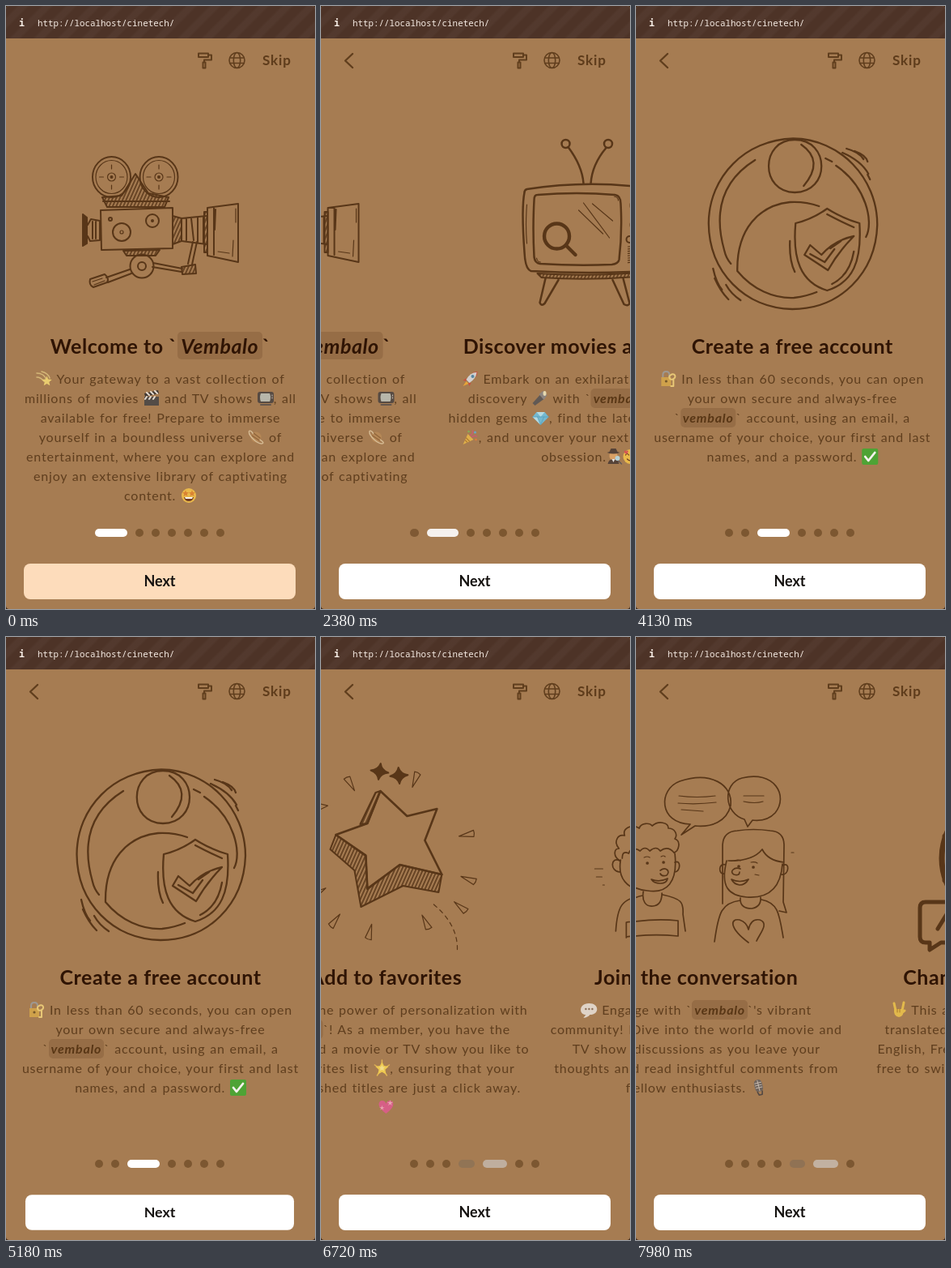
Recreate the animation shown at these times as an HTML page. Size 382 by 744 pixels, loop 8000 ms.

```html
<!DOCTYPE html>
<html lang="en">
<head>
<meta charset="utf-8">
<title>Onboarding</title>
<style>
html, body { margin: 0; width: 100%; height: 100%; overflow: hidden; background: #3a2416; }
#stage { position: relative; width: 382px; height: 744px; overflow: hidden; background: #a67c52;
  border-radius: 4px; font-family: Lato, "Noto Sans", sans-serif; }
#bar { position: absolute; inset: 0 0 auto; height: 40px; color: #f6ece4;
  background: repeating-linear-gradient(135deg, #fff0 0 9px, #ffffff08 12px 18px, #fff0 21px), #4d3327;
  font: 10.85px/42px "Noto Sans Mono", "DejaVu Sans Mono", monospace; }
#bar span { position: absolute; left: 39px; white-space: nowrap; }
#bar b { position: absolute; left: 16px; font-size: 12px; }
svg { fill: none; stroke: #583618; stroke-width: 2; stroke-linecap: round; stroke-linejoin: round; }
#head, .art { position: absolute; left: 0; top: 0; }
#head { stroke: #603e1d; }
.ink { fill: #583618; }
.hatch { fill: url(#hatch); }
.thin { stroke-width: 1.2; }
#skip { position: absolute; left: 317px; top: 57px; font: bold 17px/20px Lato, sans-serif;
  letter-spacing: .9px; color: #5e3c1b; }
#track { position: absolute; left: 0; top: 0; }
.page { position: absolute; top: 0; width: 382px; height: 744px; }
h1 { position: absolute; top: 402px; width: 100%; margin: 0; font: bold 25px/34px Lato, sans-serif;
  letter-spacing: .55px; text-align: center; white-space: nowrap; color: #2f1404; }
p { position: absolute; top: 447.5px; width: 100%; margin: 0; font-size: 16px; line-height: 24px;
  letter-spacing: .78px; word-spacing: 1px; text-align: center; color: #5f3e1e; }
p span { display: block; height: 24px; white-space: nowrap; }
em { display: inline-block; padding: 0 4.5px; border-radius: 5px; background: #5a3a1c38; font-weight: bold; }
p em { padding: 0 3px; color: #583615; }
.emo { width: 20px; height: 20px; vertical-align: -4px; stroke: none; opacity: .9; overflow: visible; }
#dots { position: absolute; left: 110px; top: 645px; display: flex; gap: 10px; }
#dots i { height: 10px; border-radius: 5px; }
#next { position: absolute; left: 22px; top: 688px; width: 336px; height: 44px; border-radius: 8px;
  font: bold 18px/43px Lato, sans-serif; text-align: center; color: #151210; }
</style>
</head>
<body>
<div id="stage">
  <div id="track"></div>
  <div id="bar"><b>i</b><span>http://localhost/cinetech/</span></div>
  <svg id="head" width="382" height="100">
    <defs>
      <pattern id="hatch" width="4" height="4" patternUnits="userSpaceOnUse" patternTransform="rotate(24)">
        <path d="M1 0V4" stroke="#583618" stroke-width="1.6"/>
      </pattern>
    </defs>
    <path id="back" d="M39 59L30 67.5L39 76" stroke-width="2.4"/>
    <path d="M238 58.5h12v4.500h-12zM250 60.5h4v6h-9v3M243.500 69.500h3v7h-3z"/>
    <g stroke-width="1.6"><circle cx="285.5" cy="67" r="9.5"/><ellipse cx="285.5" cy="67" rx="4.2" ry="9.5"/>
      <path d="M277 64h17M277 70.5h17"/></g>
  </svg>
  <div id="skip">Skip</div>
  <div id="dots"></div>
  <div id="next">Next</div>
</div>
<script>
const LOOP = 8000, WIDTH = 382;
const SLIDES = [2235, 3772, 5382, 6642, 7900];
const PRESSES = [2030, 3595, 5153, 6515, 7640];
const $ = id => document.getElementById(id);

const path = (d, cls = '') => `<path class="${cls}" d="${d}"/>`;
const oval = (x, y, rx, ry = rx, cls = '') => `<ellipse class="${cls}" cx="${x}" cy="${y}" rx="${rx}" ry="${ry}"/>`;
const at = (x, y, deg, shape) => `<g transform="translate(${x} ${y}) rotate(${deg})">${shape}</g>`;
const weight = (w, shape) => `<g stroke-width="${w}">${shape}</g>`;
const repeat = (n, draw) => Array.from({ length: n }, (_, i) => draw(i)).join('');
const star = (x, y, r, k = .45) => 'M' + Array.from({ length: 10 }, (_, i) => {
  const a = i * Math.PI / 5 - Math.PI / 2, q = i % 2 ? r * k : r;
  return (x + q * Math.cos(a)).toFixed(1) + ' ' + (y + q * Math.sin(a)).toFixed(1);
}).join('L') + 'z';

// Emoji, each on a 20 x 20 grid
const fill = (c, d) => `<path fill="${c}" d="${d}"/>`;
const disc = (c, x, y, r, ry = r) => `<ellipse fill="${c}" cx="${x}" cy="${y}" rx="${r}" ry="${ry}"/>`;
const line = (c, w, d) => `<path fill="none" stroke="${c}" stroke-width="${w}" d="${d}"/>`;
const HEART = 'M10 18C-3 9 1 2 5 2Q9 2 10 6Q11 2 15 2C19 2 23 9 10 18z';
const face = disc('#f2c04a', 10, 10, 9);
const EMOJI = {
  dizzy: line('#d9bd7c', 1.6, 'M1 3Q10 3 13 11M1 8Q6 8 10 13M7 1Q15 3 17 9') + fill('#f1d573', star(13.5, 13, 6.5)),
  clap: fill('#4b4746', 'M1 8h18v11H1z') + fill('#37302e', 'M1 4L18 0l1 4L2 8z') +
    line('#ece5dd', 2, 'M4 3l3 3M9 2l3 3M14 1l3 3M4 8l-2 3M9 8l-2 3M14 8l-2 3'),
  tv: fill('#4e4541', 'M3 2h14q3 0 3 3v8q0 3-3 3H3q-3 0-3-3V5q0-3 3-3z') + line('#5c524d', 2, 'M4 18h12') +
    fill('#b9bdb4', 'M4 4h11q2 5 0 10H4q-2-5 0-10z') + line('#d6cdc2', 1, 'M18 6v1M18 9v1'),
  planet: disc('#b88a58', 10, 10, 6.5) + line('#8d6238', 1.2, 'M7 5l8 6M5 8l9 6') +
    at(10, 10, 42, line('#dcc39c', 1.4, 'M-6-1C-15-3-12 4 0 4S15-3 6-1')),
  starry: face + fill('#e0842f', star(6, 7.5, 4.2)) + fill('#e0842f', star(14, 7.5, 4.2)) +
    fill('#6a331b', 'M4 12h12q-1 5-6 5t-6-5z') + fill('#fff', 'M5 12h10l-1 2H6z'),
  rocket: fill('#c94b3d', 'M5 9L1 12l4 1zM11 15l-2 4l-2-4zM13 2l6-1l-1 6z') +
    fill('#d6d9dc', 'M18 2Q10 2 5 11l4 4Q17 10 18 2z') + disc('#4f87a8', 13, 7, 2) + fill('#efaa36', 'M5 13l3 3l-7 3z'),
  torch: fill('#5a5655', 'M1 16L10 6l5 5L4 19z') + fill('#8b8583', 'M9 5l5-4l5 5l-4 6z') + disc('#ece2ba', 16, 4, 2, 3),
  gem: fill('#6fbfdd', 'M5 3h10l5 6l-10 10L0 9z') + fill('#b6e5f2', 'M5 3l5 6l5-6zM0 9h6l4 10z') + line('#4a9fc3', .7, 'M0 9h20M6 9l4 10l4-10'),
  party: fill('#e6b64a', 'M1 19L7 6l7 7z') + line('#b27a33', 1.2, 'M5 11l4 4M4 14l2 2') +
    line('#cf5874', 1.5, 'M10 8q4-2 3-6M12 10q3-3 6-1') + disc('#66a9d0', 16, 4, 1.5) + disc('#82b45a', 8, 3, 1.3) + disc('#e77b3b', 17, 13, 1.3),
  sleuth: disc('#dfa568', 9, 9, 5, 6) + fill('#4e3d36', 'M1 5Q9 8 17 5l-3-1l-2-4H6L4 4zM2 19q1-6 7-6t7 6z') +
    fill('#eee', 'M7 13h4l-2 4z') + line('#59565a', 1.5, 'M15 15l4 4') + disc('#b9dae2', 14, 12, 3),
  love: face + line('#65351d', 1.2, 'M4 8q2-3 4 0M12 8q2-3 4 0M6 13q4 4 8 0') +
    [[2, 2], [15, 1], [14, 14]].map(([x, y]) => `<g transform="translate(${x} ${y}) scale(.28)">${fill('#dc4f52', HEART)}</g>`).join(''),
  lock: line('#9e9c98', 2, 'M3 9V5q0-4 4-4t4 4v4') + fill('#d4a64b', 'M1 8h12v11H1z') +
    line('#efd07a', 2, 'M16 10v9h-3M13 5a3 3 0 1 1 3 5a3 3 0 1 1-3-5') + disc('#6f5226', 7, 13, 1.6),
  check: fill('#45a832', 'M2 0h16q2 0 2 2v16q0 2-2 2H2q-2 0-2-2V2q0-2 2-2z') + line('#fff', 2.8, 'M4 10l4 5l8-10'),
  palette: fill('#c79361', 'M10 2C-2 2-3 18 9 18q4 0 2-4t4-2q5 0 5-4q-1-6-10-6z') + disc('#cc4840', 5, 7, 2) +
    disc('#e5bf42', 10, 5, 2) + disc('#579c62', 15, 8, 2) + disc('#4c79ac', 4, 12, 2) + line('#58382a', 1.5, 'M13 17l6-7'),
  glow: line('#e6b955', 1.5, 'M10 0v3M1 6l3 2M19 6l-3 2M4 19l2-3M16 19l-2-3') + fill('#f6d251', star(10, 10.5, 8.5, .5)) + fill('#fbe78e', star(10, 10, 4, .5)),
  heart: fill('#dc5c8c', HEART) + fill('#f1aebd', star(15, 5, 4, .3)) + fill('#f1aebd', star(5, 11, 3.5, .3)),
  speech: fill('#e6ddd4', 'M10 2C-3 2-3 16 6 16l-3 4q6-1 8-4C23 16 23 2 10 2z') + repeat(3, i => disc('#8a6e58', 6 + 4 * i, 9, 1.2)),
  mic: at(10, 10, -14, `<g transform="translate(-10 -10)">${fill('#68615e', 'M5 6q0-6 5-6t5 6v4q0 5-5 5t-5-5z') +
    line('#c8beb5', 1, 'M6 4h8M6 7h8M6 10h8M10 1v13') + line('#4b4341', 1.6, 'M7 15l1 4h4l1-4')}</g>`),
  hand: line('#e9c04c', 3, 'M4 2l2 9M16 1l-2 10M17 11l-4 3') + fill('#e9c04c', 'M4 9h11q2 9-5 10Q3 18 4 9z') + line('#a97828', 1, 'M8 9v4M11 9v4')
};

// Illustrations, in page coordinates
const reel = x => oval(x, 211, 23.5, 25) + oval(x, 211, 19.5, 20.5, 'thin') + oval(x, 211, 5, 5, 'thin') + oval(x, 211, 1, 1, 'ink') +
  repeat(4, i => at(x, 211, i * 90, path('M10 0h5', 'thin')));
const camera = () => path('M119 236L125 248H196L201 236L176 231L160 207L143 234z', 'hatch') + reel(130.5) + reel(189) +
  path('M120 241H202M117 252L206 249V299L118 301z') +
  oval(143, 279, 11) + oval(143, 279, 2, 2, 'thin') + oval(181, 265, 8) + oval(181, 265, 1) + oval(129, 263, 2) +
  path('M95 257L100 261V293L95 296z', 'ink') + path('M101 270L105 263L116 265V289L104 290L101 284M107 266V287M111 266V287') +
  path('M206 259L217 262V290L206 294z', 'hatch') + path('M217 262L248 259M217 290L248 294M223 262V289M229 262L232 289M237 261V291M244 260V292') +
  path('M249 249L287 244V316L249 308zM257 248V307M259 251l-1 25') + path('M245 254h4v50h-4z', 'hatch') + path('M284 250v17M281 289l-1 20M262 303l14 2', 'thin') +
  path('M145 302L149 308H185L190 301z', 'hatch') + oval(168, 321, 14.5) + oval(168, 321, 5) +
  path('M153 325L124 335M155 330L126 341M104 337L122 331Q128 336 125 341L108 347Q102 344 104 337zM182 317L218 324M181 322L217 328M236 291L230 319M231 291L225 318') +
  path('M217 322L234 319L235 330L218 331z', 'hatch') + path('M107 340l12-4M109 344l13-5', 'thin');

const tv = () => weight(2.5, oval(161, 170, 5) + oval(213.5, 170, 5) +
  path('M164 174C176 190 182 205 183 219M211 175C200 188 193 204 192 219') +
  path('M113 226Q190 214 267 225Q273 229 273 260Q274 300 271 320Q270 327 260 327Q190 331 118 327Q111 325 110 304Q106 250 110 230Q110 227 113 226z') +
  path('M126 233Q175 229 222 233Q229 234 229 244Q231 280 227 313Q226 318 218 319Q175 321 129 318Q123 317 122 310Q120 275 122 239Q122 233 126 233z') +
  path('M136 336L129 366Q131 371 135 367L152 338M219 338L233 368Q238 371 240 367L232 336')) +
  weight(4.4, oval(150, 284, 15.5) + path('M162 296L173 307')) +
  path('M177 252L207 281M183 243L215 286M194 244L219 265M113 245Q111 270 113 293M221 235q5 1 5 5M125 311q1 5 5 5', 'thin') +
  oval(251, 246, 10, 11) + path('M244 239L254 256M249 236L260 253M252 235l7 13') + path('M241 236q4-4 8-4M262 238q4 8 0 16', 'thin') +
  oval(250, 270, 9, 8) + oval(250, 270, 5, 4, 'thin') + path('M243 261q7-4 14 1', 'thin') + oval(240, 288, 4) + oval(260, 288, 4) +
  repeat(8, i => path(`M238 ${297 + i * 2.8}Q250 ${296 + i * 2.8} 262 ${297 + i * 2.8}`, 'thin')) +
  path('M126 330Q188 334 250 329L246 334Q188 339 131 335z', 'hatch');

const account = () => weight(2.3,
  path('M192 163.5C250 164 296 212 296 270C294 330 250 374 191 374C132 373 88 328 87.5 268C88 210 133 165 192 163.5z') +
  path('M145 190C100 218 95 260 107 302Q109 311 115 318M232 188L240 192M245 197C282 222 292 266 282 285') +
  path('M194 165C238 165 238 230 194 230C151 230 151 165 194 165zM202 171Q231 191 205 222') +
  path('M224 247Q207 241 188 242C150 246 122 275 123 327C142 350 168 361 193 360Q209 358 221 353') +
  path('M234 250Q253 262 274 268C277 315 266 341 234 351C201 341 191 312 195 268Q216 263 234 250zM234 257Q251 266 267 273M267 303Q262 332 240 343M188 290Q187 314 194 328') +
  path('M206 307L213 295L227 307Q243 289 267 284Q248 303 235 326zM213 306L231 316L243 300M238 299l13-9') +
  path('M253 181Q276 191 285 207M258 176Q273 180 279 189M268 179Q282 184 284 192M284 208l3 6M93 324Q97 342 104 350M95 336Q102 352 112 362M109 344Q115 355 127 363'));

const SPARK = 'M0-10Q2-2 11 0Q2 2 0 10Q-2 2-11 0Q-2-2 0-10z';
const RAYS = [[147, 181], [227, 176], [291, 244], [98, 233], [293, 299], [283, 333], [108, 315], [128, 350], [171, 364], [240, 352]];
const favorite = () => path('M129 244L122 262L152 288L160 333L212 307L256 315L260 293L208 281L168 310L166 269z', 'hatch') +
  path('M184 190L178 192L159 231L168 230z', 'hatch') +
  weight(2.6, path('M184 190L217 221L254 212L239 251L260 293L208 281L168 311L166 270L129 244L168 230z')) +
  at(183, 166, 8, path(SPARK, 'ink')) + at(207, 171, -4, path(SPARK, 'ink')) +
  at(102, 210, 12, path(star(0, 0, 17, .42), 'thin')) +
  RAYS.map(([x, y]) => at(x, y, Math.atan2(262 - y, 195 - x) * 180 / Math.PI, path('M10 0L-8-4Q-10 0-9 4z', 'thin'))).join('') +
  '<path class="thin" stroke-dasharray="5 5" d="M250 330Q281 356 279 388"/>';

const talk = () => weight(1.7,
  path('M171 244L182 231C143 230 142 188 169 178C207 165 235 182 232 208C227 228 208 235 188 233zM253 234L249 225C224 218 221 181 246 174C286 164 304 196 287 217Q277 228 259 226z') +
  path('M168 196Q190 199 213 196M167 205Q190 207 214 204M171 213l27 2M248 196h25M248 203Q262 206 272 203', 'thin') +
  path('M98 276C89 270 91 261 97 261C90 253 95 243 104 245C101 236 112 231 119 236C121 229 132 229 135 233C143 226 155 229 155 236C163 236 167 244 163 249C171 252 168 264 162 266') +
  path('M101 273Q101 263 109 267Q112 258 120 264Q126 257 132 264Q140 257 145 264Q154 257 162 266') +
  path('M99 275C95 298 107 311 129 313C153 317 167 303 163 267M98 276C87 270 85 289 98 290M163 278C171 274 170 290 163 290M145 288C152 283 158 289 153 294Q147 296 145 292M134 299Q144 303 154 298Q153 304 145 304Q137 304 134 299z') +
  path('M124 314C122 326 127 333 136 332Q147 331 147 316M123 319C101 324 95 331 93 363M148 318C171 323 174 327 173 342L176 363M106 371V352Q140 347 167 350V369Q135 366 106 370') +
  oval(129, 279, 1) + oval(149, 278, 1) + path('M67 286h10M69 296h7M77 306h2M125 272q4-2 7 0M146 271q3-2 5 0M307 266h3', 'thin') +
  path('M222 329V258Q222 240 240 239Q260 236 281 239Q298 240 298 257L297 327L301 340L292 338M229 276Q259 277 271 262Q278 276 298 278') +
  path('M227 276C219 308 229 319 252 321C281 323 294 308 296 280M226 281C216 278 217 294 224 292M296 282C306 276 304 295 295 293M244 286C236 283 230 290 236 293Q243 295 243 290M233 299Q243 304 254 299Q250 306 243 306Q236 305 233 299z') +
  path('M244 322C243 332 250 335 258 335Q270 333 269 321M244 325C221 328 217 339 212 376M270 324C291 328 292 342 297 371M254 377C230 359 231 347 243 349Q252 352 254 361Q257 347 268 349C280 353 268 366 264 375') +
  oval(242, 283, 1) + oval(260, 284, 1) + path('M237 276q4-2 7 0M257 278q5-1 8 1M262 293l5 1', 'thin'));

const language = () => weight(7, oval(191, 273, 80) + oval(191, 273, 40, 80) + path('M115 246H267M115 300H267')) +
  weight(5, '<path fill="#a67c52" d="M91 327H144Q151 327 151 334V370Q151 377 144 377H110L96 386V377H91Q84 377 84 370V334Q84 327 91 327z"/>' +
  path('M106 360L117 342L128 360'));

const PAGES = [
  ['Welcome to `*Vembalo*`', camera, ['{dizzy} Your gateway to a vast collection of', 'millions of movies {clap} and TV shows {tv}, all',
    'available for free! Prepare to immerse', 'yourself in a boundless universe {planet} of',
    'entertainment, where you can explore and', 'enjoy an extensive library of captivating', 'content. {starry}']],
  ['Discover movies and series', tv, ['{rocket} Embark on an exhilarating journey of', 'discovery {torch} with `*vembalo*`! Unearth',
    'hidden gems {gem}, find the latest blockbusters', '{party}, and uncover your next binge-worthy', 'obsession.{sleuth}{love}']],
  ['Create a free account', account, ['{lock} In less than 60 seconds, you can open', 'your own secure and always-free',
    '`*vembalo*` account, using an email, a', 'username of your choice, your first and last', 'names, and a password. {check}']],
  ['Add to favorites', favorite, ['{palette} Unlock the power of personalization with', '`*vembalo*`! As a member, you have the',
    'ability to add a movie or TV show you like to', 'your favorites list {glow}, ensuring that your',
    'most cherished titles are just a click away.', '{heart}']],
  ['Join the conversation', talk, ['{speech} Engage with `*vembalo*`\'s vibrant', 'community! Dive into the world of movie and',
    'TV show discussions as you leave your', 'thoughts and read insightful comments from', 'fellow enthusiasts. {mic}']],
  ['Change your language', language, ['{hand} This application has already been', 'translated into several languages, with',
    'English, French, Spanish and Arabic. Feel', 'free to switch to another language today', 'from the settings.']]
];
const rich = s => s.replace(/\*(\w+)\*/g, '<em>$1</em>')
  .replace(/\{(\w+)\}/g, (_, k) => `<svg class="emo" viewBox="0 0 20 20">${EMOJI[k]}</svg>`);
$('track').innerHTML = PAGES.map(([title, art, lines], i) => `<div class="page" style="left:${i * WIDTH}px">
  <svg class="art" width="382" height="400">${art()}</svg><h1>${rich(title)}</h1>
  <p>${lines.map(l => `<span>${rich(l)}</span>`).join('')}</p></div>`).join('');
$('dots').innerHTML = '<i></i>'.repeat(7);

// Motion
const clamp = x => Math.min(1, Math.max(0, x));
function bezier(x1, y1, x2, y2) {
  const f = (a, b, u) => 3 * a * u * (1 - u) ** 2 + 3 * b * u * u * (1 - u) + u ** 3;
  return x => {
    if (x <= 0 || x >= 1) return clamp(x);
    let lo = 0, hi = 1;
    for (let i = 0; i < 24; i++) {
      const mid = (lo + hi) / 2;
      if (f(x1, x2, mid) < x) lo = mid; else hi = mid;
    }
    return f(y1, y2, lo);
  };
}
const ease = bezier(.25, .1, .25, 1), settle = bezier(0, 0, .2, 1);
const mix = (a, b, k) => `rgb(${a.map((v, i) => Math.round(v + (b[i] - v) * k))})`;
const progress = (t, ms) => SLIDES.reduce((sum, s) => sum + ease((t - s) / ms), 0);

function draw(t) {
  $('track').style.transform = `translateX(${-WIDTH * progress(t, 400)}px)`;
  $('back').style.display = t < SLIDES[0] ? 'none' : '';
  const active = progress(t, 200);
  [...$('dots').children].forEach((dot, i) => {
    const k = clamp(1 - Math.abs(active - i));
    dot.style.width = 10 + 30 * k + 'px';
    dot.style.background = mix([74, 42, 8], [255, 255, 255], k);
    dot.style.opacity = .45 + .55 * k;
  });
  const press = PRESSES.reduce((sum, p, i) =>
    sum + settle((t - p) / 200) * (1 - settle((t - SLIDES[i] + 60) / 120)), 0);
  $('next').style.transform = `scale(${1 - .03 * press})`;
  $('next').style.background = mix([253, 220, 187], [255, 255, 255], settle((t - 1680) / 200));
}
const start = performance.now();
function tick() {
  draw((performance.now() - start) % LOOP);
  requestAnimationFrame(tick);
}
tick();
</script>
</body>
</html>
```
